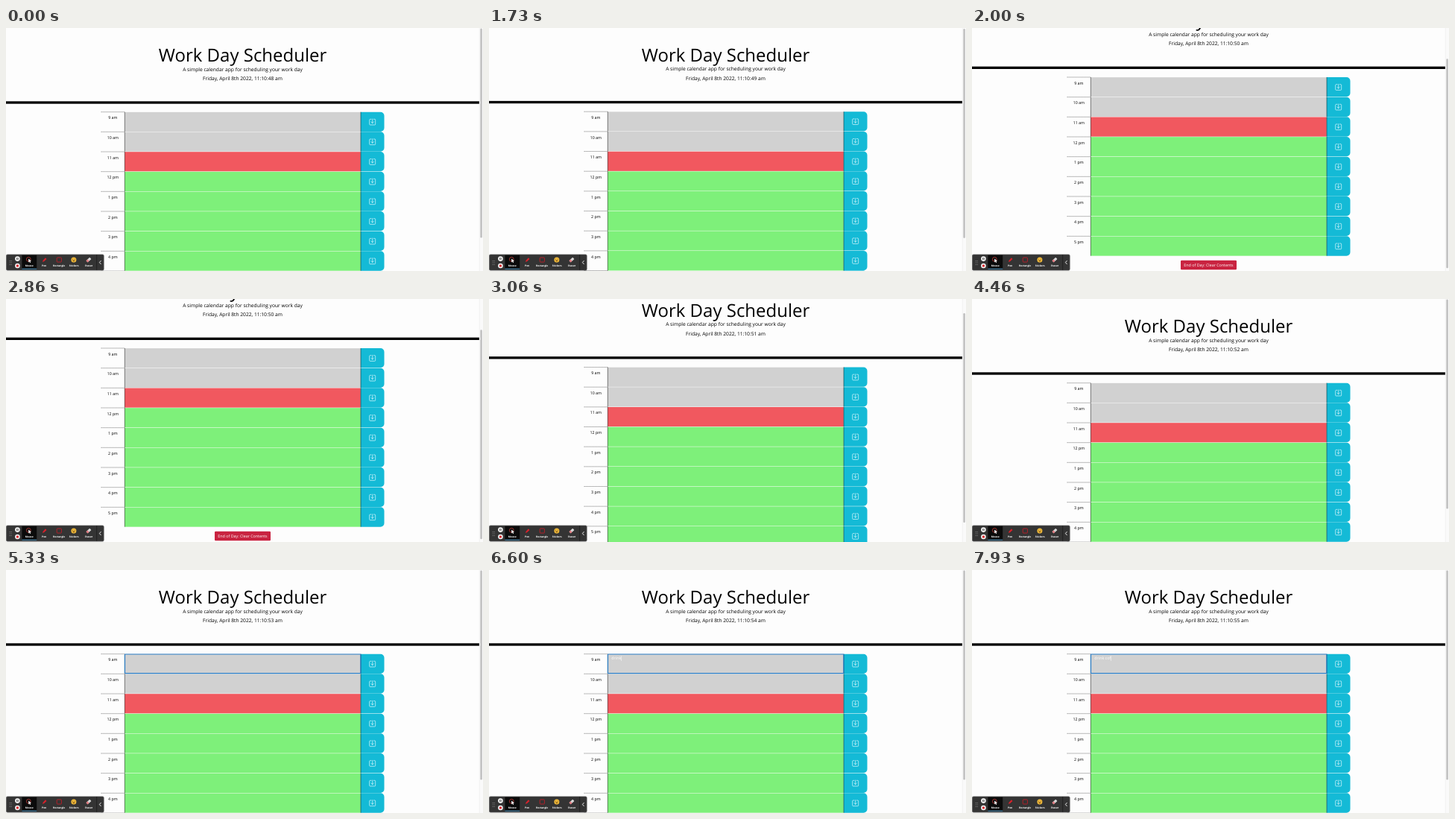
Animation, 640 px wide and 326 px high, one loop 8 s. Source, as an HTML page:

```html
<!DOCTYPE html>
<html lang="en">
<head>
<meta charset="utf-8">
<title>Work Day Scheduler</title>
<style>
  html, body { margin: 0; width: 100%; height: 100%; overflow: hidden; background: #fdfdfd; }
  svg { display: block; width: 100vw; height: 100vh; }
  text { font-family: "Open Sans", sans-serif; text-rendering: geometricPrecision; white-space: pre; }
  .mid { text-anchor: middle; }
  .tools text { font-size: 3.3px; font-weight: 700; fill: #fff; text-anchor: middle; }
</style>
</head>
<body>
<svg viewBox="0 0 640 326" preserveAspectRatio="none">
  <defs>
    <g id="save" fill="none" stroke="#e8fbff" stroke-width="2" stroke-linecap="round" stroke-linejoin="round">
      <path d="M-5-11H-9Q-12-11-12-8V9Q-12 12-9 12H9Q12 12 12 9V-8Q12-11 9-11H5"/>
      <path d="M0-12V5M-5 0L0 5L5 0"/>
    </g>
  </defs>

  <rect width="640" height="326" fill="#fdfdfd"/>
  <g id="page">
    <text class="mid" x="952.5" y="135" font-size="72">Work Day Scheduler</text>
    <text class="mid" x="952.5" y="173" font-size="20">A simple calendar app for scheduling your work day</text>
    <text class="mid" id="clock" x="952.5" y="210" font-size="20"></text>
    <rect y="295" width="1905" height="10"/>
    <g id="rows" font-size="16"></g>
    <g id="entry" visibility="hidden">
      <rect x="478.5" y="339" width="949" height="77" rx="2" fill="none" stroke="#2b7fc8" stroke-width="3.5"/>
      <text id="note" x="493" y="361" font-size="16" fill="#fff"></text>
      <rect id="caret" y="346" width="1.5" height="20" fill="#fff"/>
    </g>
    <rect x="840" y="1075" width="225" height="38" rx="4" fill="#c92340"/>
    <text class="mid" x="952.5" y="1100" font-size="16" fill="#fff">End of Day: Clear Contents</text>
  </g>

  <rect x="635" width="5" height="326" fill="#fafafa"/>
  <path d="M635.2 0V326" stroke="#e6e6e6" stroke-width=".4"/>
  <rect id="thumb" x="636.3" width="2.6" height="281" rx="1.3" fill="#c1c1c1"/>

  <g class="tools">
    <rect x=".4" y="303.9" width="130.8" height="21.2" rx="1.6" fill="#343434" stroke="#5c5c5c" stroke-width=".7"/>
    <path d="M121.7 304.2V324.8" stroke="#1c1c1c" stroke-width=".8"/>
    <path d="M5.2 312V319M7.2 312V319" stroke="#999" stroke-width=".9" stroke-dasharray=".9 1.6"/>
    <circle cx="15.4" cy="309.6" r="3.3" fill="#f4f4f4"/>
    <path d="M14.6 308.2V311M16.2 308.2V311" stroke="#333" stroke-width=".8"/>
    <circle cx="15.4" cy="319" r="3.3" fill="#f4f4f4"/>
    <rect x="13.9" y="317.5" width="3" height="3" rx=".4" fill="#d8262c"/>
    <rect x="21.4" y="304.8" width="19.8" height="18.6" fill="#0b0b0b"/>
    <rect x="21.4" y="322.7" width="19.8" height=".9" fill="#4c9fd0"/>
    <circle cx="30.3" cy="310.3" r="2.9" fill="none" stroke="#c4413c" stroke-width=".8"/>
    <path d="M30.2 309.6L34 312.4L32.3 312.8L33.2 314.6L32.2 315L31.4 313.3L30.2 314.4Z" fill="#fff"/>
    <path d="M49 313.8L49.5 311.9L52.9 308.3L54.5 309.9L50.9 313.3Z" fill="#d8212b"/>
    <rect x="68.2" y="308" width="6.2" height="6" rx=".8" fill="none" stroke="#b3202a" stroke-width="1"/>
    <circle cx="90.9" cy="311" r="3.5" fill="#f3bd3c"/>
    <path d="M89 311.8Q90.9 314.4 92.8 311.8Z" fill="#68400f"/>
    <circle cx="89.6" cy="310" r=".55" fill="#68400f"/>
    <circle cx="92.2" cy="310" r=".55" fill="#68400f"/>
    <g transform="rotate(-42 111 311)">
      <rect x="107.6" y="309.4" width="6.6" height="3.2" rx=".6" fill="#d5d5d5"/>
      <rect x="107.6" y="309.4" width="2.6" height="3.2" rx=".6" fill="#e2777d"/>
    </g>
    <path d="M127.5 312.1L125.4 314.5L127.5 316.9" fill="none" stroke="#fff" stroke-width=".9"/>
    <g id="labels"></g>
  </g>
</svg>
<script>
const LOOP = 8000, MAX_SCROLL = 46.67;
const FOCUS = 4730;
const NOTE = "drink cof";
const KEYS = [6200, 6260, 6330, 6400, 6600, 6660, 7400, 7800, 7930];
const $ = id => document.getElementById(id);

function buildRows() {
  const hours = ["9 am", "10 am", "11 am", "12 pm", "1 pm", "2 pm", "3 pm", "4 pm", "5 pm"];
  $("rows").innerHTML = hours.map((hour, i) => {
    const y = 337 + i * 80;
    const fill = i < 2 ? "#d1d1d1" : i === 2 ? "#f1585f" : "#7ef07a";
    return `<path d="M382.5 ${y + 1}H477" stroke="#222" stroke-width="1.4" stroke-dasharray="4 2"/>
      <text class="mid" x="430" y="${y + 30}">${hour}</text>
      <rect x="477.5" y="${y + 1.5}" width="950" height="78.5" fill="${fill}"/>
      <path d="M1427.5 ${y + 1}H1507.5a15 15 0 0 1 15 15V${y + 65}a15 15 0 0 1-15 15H1427.5Z" fill="#14bad6"/>
      <path d="M478 ${y + 1}v79M1428 ${y + 1}v79" stroke="#111" stroke-width="1.5"/>
      <use href="#save" x="1475" y="${y + 41}"/>`;
  }).join("");
}

function buildLabels() {
  const names = ["Mouse", "Pen", "Rectangle", "Stickers", "Eraser"];
  $("labels").innerHTML = names.map((name, i) =>
    `<text x="${31.2 + i * 20}" y="319.5">${name}</text>`).join("");
}

const progress = (t, from, to) => Math.min(1, Math.max(0, (t - from) / (to - from)));

// Quick pull to the bottom, then a coasting return to the top.
function scrollAt(t) {
  const down = progress(t, 1715, 1990), up = progress(t, 2870, 3455);
  return MAX_SCROLL * (down * down * (3 - 2 * down) - (1 - (1 - up) ** 2));
}

function drawEntry(t) {
  $("entry").setAttribute("visibility", t >= FOCUS ? "visible" : "hidden");
  const typed = KEYS.filter(k => k <= t);
  const since = t - (typed.length ? typed[typed.length - 1] : FOCUS);
  const note = $("note");
  note.textContent = NOTE.slice(0, typed.length);
  $("caret").setAttribute("x", 493 + (typed.length ? note.getComputedTextLength() : 0));
  $("caret").setAttribute("opacity", since % 1000 < 500 ? 1 : 0);
}

function draw(t) {
  const scroll = scrollAt(t);
  $("page").setAttribute("transform", `translate(0 ${-scroll}) scale(${1 / 3})`);
  $("thumb").setAttribute("y", 0.5 + scroll * 326 / (326 + MAX_SCROLL));
  $("clock").textContent = `Friday, April 8th 2022, 11:10:${48 + Math.floor(t / 1000)} am`;
  drawEntry(t);
}

function tick() {
  draw(performance.now() % LOOP);
  requestAnimationFrame(tick);
}

buildRows();
buildLabels();
tick();
</script>
</body>
</html>
```
